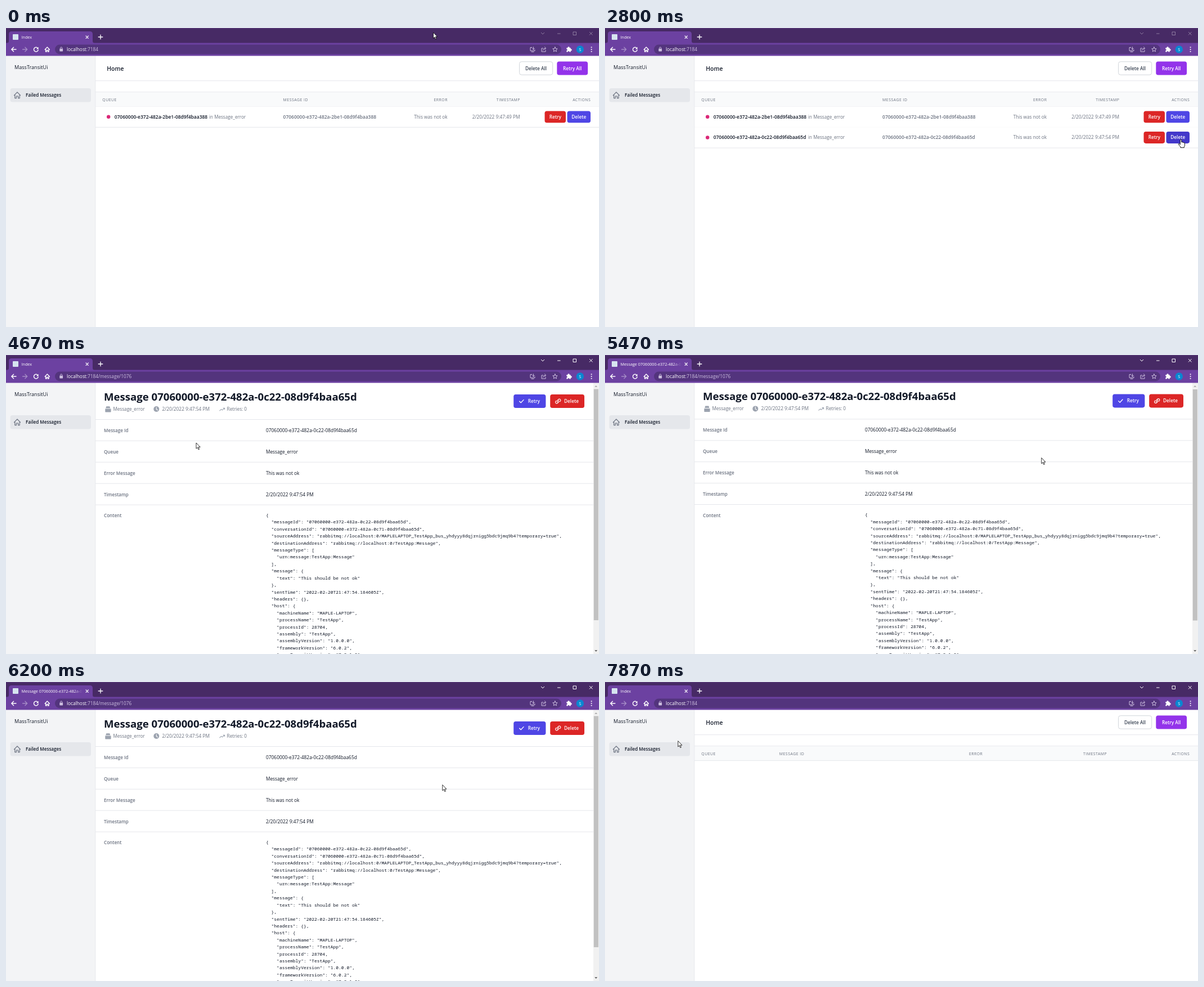
Recreate the animation shown at these times as an HTML page. Size 1054 by 531 pixels, loop 8 s.

```html
<!DOCTYPE html>
<html lang="en">
<head>
<meta charset="utf-8">
<title>Failed messages</title>
<style>
html, body { margin: 0; width: 100%; height: 100%; overflow: hidden; background: #fff; }
svg { display: block; width: 1054px; height: 531px; }
text { font-family: "Open Sans", "Noto Sans", sans-serif; white-space: pre; }
.code text { font-family: "Noto Sans Mono", "DejaVu Sans Mono", monospace; }
.line { fill: none; stroke-linecap: round; stroke-linejoin: round; }
</style>
</head>
<body>
<svg id="stage" viewBox="0 0 1054 531" xmlns="http://www.w3.org/2000/svg"></svg>
<script>
const LOOP = 8000;
const INK = '#111827', GRAY = '#6b7280', RULE = '#e5e7eb', SOFT = '#f3f4f6';
const RED = '#dc2626', INDIGO = '#4f46e5', VIOLET = '#9333ea';
const DARKER = { [RED]: '#b91c1c', [INDIGO]: '#4338ca', [VIOLET]: '#7e22ce' };
const ID1 = '07060000-e372-482a-2be1-08d9f4baa388';
const ID2 = '07060000-e372-482a-0c22-08d9f4baa65d';

const escape = s => s.replace(/&/g, '&amp;').replace(/</g, '&lt;');
const text = (x, y, s, { size = 8.25, weight = 400, fill = GRAY, anchor = 'start', gap = 0 } = {}) =>
  `<text x="${x}" y="${y}" font-size="${size}" font-weight="${weight}" fill="${fill}" text-anchor="${anchor}" letter-spacing="${gap}">${escape(s)}</text>`;
const rect = (x, y, w, h, fill, r = 0, more = '') =>
  `<rect x="${x}" y="${y}" width="${w}" height="${h}" rx="${r}" fill="${fill}" ${more}/>`;
const rule = (y, fill = RULE, more = '') => rect(159, y, 895, 1, fill, 0, more);
const line = (d, color, width = 1.2, more = '') =>
  `<path class="line" d="${d}" stroke="${color}" stroke-width="${width}" ${more}/>`;
const shape = (d, fill, more = '') => `<path d="${d}" fill="${fill}" ${more}/>`;
const group = (id, body, more = '') => `<g id="${id}" ${more}>${body}</g>`;
const ring = (id, x, y, w, h, color) =>
  rect(x - 1.9, y - 1.9, w + 3.8, h + 3.8, 'none', 5, `id="${id}" stroke="${color}" stroke-width="1.3"`);

// Buttons register their box so the pointer can hover them.
const buttons = [];
function button(id, x, y, w, h, fill, label, labelX = x + w / 2) {
  buttons.push({ id, x, y, w, h, fill });
  return rect(x, y, w, h, fill, 3.8, `id="${id}"`) +
    text(labelX, y + h / 2 + 3, label, { weight: 600, fill: '#fff', anchor: 'middle' });
}

function chrome() {
  const white = '#fff', pale = '#cdbfe0';
  return rect(0, 0, 1054, 27, '#472a65') + rect(0, 0, 1054, 1, '#573a78') +
    rect(0, 26.5, 1054, 23, '#6c41a1') +
    shape('M1 27Q5 27 5 23V11Q5 6 10 6H149Q154 6 154 11V23Q154 27 158 27Z', '#6c41a1') +
    rect(12, 11, 10, 10, '#d6e4f0', 1) +
    `<g clip-path="url(#tabClip)" mask="url(#tabFade)">` +
    group('tabHome', text(27.5, 18.8, 'Index', { size: 7.2, fill: white })) +
    group('tabMessage', text(27.5, 18.8, 'Message ' + ID2, { size: 7.2, fill: white })) + '</g>' +
    line('M142 14L146.4 18.4M146.4 14L142 18.4', white, 1.1) +
    line('M164.2 16H171.8M168 12.2V19.8', white, 1.3) +
    group('controls',
      line('M951 8L954 11L957 8M980 10H985.5M1008 7H1013.5V12.5H1008ZM1037 7L1042.5 12.5M1042.5 7L1037 12.5', white, 1, 'style="stroke-linecap:butt"')) +
    line('M18 38H10M13.6 34.2L9.8 38L13.6 41.8', white, 1.4) +
    line('M29.5 38H37.5M33.9 34.2L37.7 38L33.9 41.8', '#a58cc6', 1.3) +
    line('M56.4 35.6A3.9 3.9 0 1 0 57.2 39', white, 1.4) + shape('M57.6 33.8V37.4H54Z', white) +
    line('M69.2 38.2L73.3 34L77.4 38.2M70.5 37.5V42H72.2V39.4H74.4V42H76.1V37.5', white, 1.3) +
    rect(87, 29.5, 900, 17, '#53347d', 8.5) +
    rect(95.3, 36.8, 5.8, 4.6, pale, .7) + line('M96.6 36.6V35.6A1.6 1.6 0 0 1 99.8 35.6V36.6', pale, 1) +
    `<text x="108" y="41" font-size="8.3" fill="${pale}"><tspan fill="${white}">localhost</tspan>:7184<tspan id="urlPath">/message/1076</tspan></text>` +
    line('M935 34.5H932V40.5H940V38.8M934 42.4H938M937.5 33.8V38.2M935.6 36.5L937.5 38.4L939.4 36.5', pale, 1) +
    line('M954.5 36H952V42H959V39.6M954.5 39.3Q955 36 959 36M957.4 33.8L959.7 36L957.4 38.2', pale, 1) +
    line('M975.9 33.8L977.1 36.6L980.1 36.9L977.8 38.9L978.5 41.9L975.9 40.3L973.3 41.9L974 38.9L971.7 36.9L974.7 36.6Z', pale, 1) +
    shape('M996.3 35.3H998.6A1.5 1.5 0 1 1 1001.4 35.3H1003.7V37.4A1.5 1.5 0 1 1 1003.7 40.2V42.5H1001.5A1.5 1.5 0 0 0 998.5 42.5H996.3V40.2A1.4 1.4 0 0 0 996.3 37.4Z', white) +
    '<circle cx="1020.3" cy="38" r="6.7" fill="#0a86d1"/>' +
    text(1020.3, 40.7, 'S', { size: 7.4, fill: white, anchor: 'middle' }) +
    [34.3, 38, 41.7].map(y => `<circle cx="1040.6" cy="${y}" r="1.05" fill="#fff"/>`).join('');
}

function sidebar() {
  return rect(0, 49.5, 158.5, 482, SOFT) + rect(158.3, 49.5, 1, 482, RULE) +
    text(15, 73.2, 'MassTransitUi', { size: 9.1, fill: INK }) +
    rect(7.5, 107, 143.5, 24.5, RULE, 3.8) +
    line('M14.4 119.6L20 114L25.6 119.6M15.8 118.4V124.6H18.4V121H21.6V124.6H24.2V118.4', GRAY, 1.2) +
    text(35, 122.2, 'Failed Messages', { size: 8.1, weight: 600, fill: INK });
}

function heads(id, messageX, errorX, timeX) {
  const style = { size: 6.9, weight: 500, gap: .5 };
  const end = { ...style, anchor: 'end' };
  return group(id, text(messageX, 129.7, 'MESSAGE ID', style) +
    text(errorX, 129.7, 'ERROR', end) + text(timeX, 129.7, 'TIMESTAMP', end));
}

function row(n, id, time) {
  return group('row' + n,
    rect(159, 139.5, 895, 36.6, '#fff') + rule(175.8, RULE, `id="rowRule${n}"`) +
    '<circle cx="182.2" cy="157.8" r="3.2" fill="#db2777"/>' +
    text(192.7, 160.8, id, { size: 8.47, weight: 600, fill: INK }) +
    text(361, 160.8, 'in Message_error', { size: 8.12 }) +
    group('cells' + n,
      text(492.6, 160.8, id, { size: 8.47, weight: 600 }) +
      text(784.6, 160.8, 'This was not ok', { anchor: 'end', size: 8.27 }) +
      text(913.6, 160.8, time, { anchor: 'end', size: 8.37 })) +
    button('retry' + n, 957.5, 147.4, 37.5, 20.8, RED, 'Retry') +
    button('delete' + n, 997.5, 147.4, 41.5, 20.8, INDIGO, 'Delete') +
    (n === 2 ? ring('rowFocus', 997.5, 147.4, 41.5, 20.8, INDIGO) : ''));
}

function home() {
  return rect(159.3, 49.5, 895, 482, '#fff') +
    text(179.3, 75.8, 'Home', { size: 10.4, weight: 600, fill: INK }) +
    rect(912.5, 59.8, 59.2, 23.4, '#fff', 3.8, 'stroke="#d1d5db" stroke-width="1"') +
    text(942, 74.5, 'Delete All', { weight: 600, fill: '#374151', anchor: 'middle' }) +
    button('retryAll', 979.3, 59.5, 54.8, 24, VIOLET, 'Retry All') +
    rule(93.2) + rule(113.2) + rect(159.3, 114.2, 895, 25, '#f9fafb') + rule(139.1) +
    text(171.3, 129.7, 'QUEUE', { size: 6.9, weight: 500, gap: .5 }) +
    text(1039.3, 129.7, 'ACTIONS', { size: 6.9, weight: 500, gap: .5, anchor: 'end' }) +
    heads('headsFull', 492.6, 785, 914) + heads('headsEmpty', 309.8, 671.4, 892.2) +
    row(1, ID1, '2/20/2022 9:47:49 PM') + row(2, ID2, '2/20/2022 9:47:54 PM');
}

const CONTENT = `{
  "messageId": "${ID2}",
  "conversationId": "07060000-e372-482a-0c71-08d9f4baa65d",
  "sourceAddress": "rabbitmq://localhost:0/MAPLELAPTOP_TestApp_bus_yhdyyy8dqjrnigg5bdc9jmq9b4?temporary=true",
  "destinationAddress": "rabbitmq://localhost:0/TestApp:Message",
  "messageType": [
    "urn:message:TestApp:Message"
  ],
  "message": {
    "text": "This should be not ok"
  },
  "sentTime": "2022-02-20T21:47:54.184605Z",
  "headers": {},
  "host": {
    "machineName": "MAPLE-LAPTOP",
    "processName": "TestApp",
    "processId": 28704,
    "assembly": "TestApp",
    "assemblyVersion": "1.0.0.0",
    "frameworkVersion": "6.0.2",
    "massTransitVersion": "7.3.1.0",
    "operatingSystemVersion": "Microsoft Windows NT 10.0.19043.0"
  }
}`;

function detail() {
  const soft = '#9ca3af';
  const fields = [['Message Id', ID2, 8.39], ['Queue', 'Message_error'], ['Error Message', 'This was not ok'],
    ['Timestamp', '2/20/2022 9:47:54 PM', 8.35], ['Content', '']];
  const page =
    text(174, 80.8, 'Message ' + ID2, { size: 18.62, weight: 700, fill: INK }) +
    shape('M178.3 91.2H184.3L185.4 94.6H177.2ZM176.3 95.6H186.6V100.8Q186.6 101.6 185.8 101.6H177.1Q176.3 101.6 176.3 100.8Z', soft) +
    text(190.4, 99, 'Message_error', { size: 8.17 }) +
    `<circle cx="267.3" cy="96" r="5" fill="${soft}"/>` + line('M267.3 93V96.2L269.5 98', '#fff', 1.1) +
    text(277.4, 99, '2/20/2022 9:47:54 PM', { size: 8.35 }) +
    line('M379.8 98.8L382.6 96.4L384.6 97.8L388.4 94.4M386 94.2H388.6V96.6', soft, 1.1) +
    text(392.6, 99, 'Retries: 0', { size: 8.2 }) +
    button('retryOne', 902.2, 70, 57.2, 24, INDIGO, 'Retry', 938.3) +
    line('M912.6 82.2L915.2 84.8L920 79.6', '#fff', 1.3) +
    button('deleteOne', 967.2, 70, 60.8, 24, RED, 'Delete', 1005) +
    line('M980.4 83.6A2.3 2.3 0 0 1 980.4 80.4L982.2 78.6A2.3 2.3 0 0 1 985.4 81.8L984.5 82.7M982 80.6A2.3 2.3 0 0 1 982 83.8L980.2 85.6A2.3 2.3 0 0 1 977 82.4L977.9 81.5', '#fff', 1.2) +
    ring('deleteFocus', 967.2, 70, 60.8, 24, RED) +
    fields.map(([label, value, size = 8.25], i) => {
      const y = 114 + i * 37.9;
      return rect(159, y, 885, 1, RULE) +
        text(174, y + 22.8, label, { size: 8.1, weight: 600 }) +
        text(462, y + 22.8, value, { size, fill: INK });
    }).join('') +
    group('json', CONTENT.split('\n').map((s, i) =>
      text(462, 287 + i * 12.41, s.replace(/ /g, '\u00a0'), { size: 7.985, weight: 500, fill: INK })).join(''), 'class="code"');
  return rect(159.3, 49.5, 895, 482, '#fff') +
    `<g clip-path="url(#pageClip)">${group('scroller', page)}</g>` +
    rect(1044, 49.5, 10, 482, '#f1f1f1') + rect(1044.7, 60.5, 8.2, 410.5, '#c1c1c1', 0, 'id="thumb"') +
    shape('M1046.2 56.8H1051.2L1048.7 54.2Z', '#505050', 'id="arrowUp"') +
    shape('M1046.2 524.2H1051.2L1048.7 526.8Z', '#505050', 'id="arrowDown"');
}

const pointer = group('cursor',
  group('arrow', shape('M0 0V10.3L2.4 8.1L4 12L5.6 11.3L4 7.5H7.2Z', '#fff', 'stroke="#000" stroke-width=".8"')) +
  group('hand', shape('M-1.2 1.2Q-1.2 0 0 0T1.2 1.2V4.6Q2.6 4 3.3 5.1Q4.7 4.6 5.4 5.8Q7 5.6 7 7.2V10Q7 11.5 5.8 13V14.4H-.6V13L-4 9Q-4.6 7.4 -3.2 7.4L-1.2 9Z',
    '#fff', 'stroke="#000" stroke-width=".9"')) +
  group('busy', '<circle cx="9" cy="0" r="3.7" fill="none" stroke="#3aa0e8" stroke-width="1.8"/>'));

document.getElementById('stage').innerHTML =
  `<defs><clipPath id="tabClip"><rect x="27" y="8" width="109" height="16"/></clipPath>
  <clipPath id="pageClip"><rect x="159" y="49.5" width="885" height="482"/></clipPath>
  <linearGradient id="fade"><stop offset=".86" stop-color="#fff"/><stop offset="1" stop-color="#000"/></linearGradient>
  <mask id="tabFade" maskUnits="userSpaceOnUse" x="27" y="8" width="109" height="16"><rect x="27" y="8" width="109" height="16" fill="url(#fade)"/></mask></defs>` +
  group('home', home()) + group('detail', detail()) + sidebar() + chrome() + pointer;

const $ = id => document.getElementById(id);
const show = (id, on) => { $(id).style.display = on ? '' : 'none'; };
const shift = (id, x, y) => $(id).setAttribute('transform', `translate(${x} ${y})`);

// Pointer moves: first step, last step, step count, end point, optional bend point.
const MOVES = [
  [2330, 2800, 8, 1023.5, 198, 1090, 60],
  [3200, 3330, 3, 1021, 158],
  [3930, 4130, 4, 354, 164],
  [4330, 4330, 1, 347, 162],
  [4400, 4470, 2, 338, 156],
  [4870, 5270, 7, 775.8, 182.6],
  [6330, 6600, 5, 1005, 82],
  [7470, 7870, 7, 129.8, 104.7]
];
// Scroll offset from each time on.
const SCROLL = [[0, 0], [5470, .6], [5530, 22], [5600, 48], [5670, 58], [6070, 40], [6130, 10], [6200, 0]];

function pointerAt(t) {
  let x = 759.5, y = 8;
  for (const [start, end, n, toX, toY, bendX = (x + toX) / 2, bendY = (y + toY) / 2] of MOVES) {
    if (t < start) break;
    const gap = n > 1 ? (end - start) / (n - 1) : 1;
    const k = Math.min(n, Math.floor((t - start) / gap + .05) + 1) / n;
    const p = k * k * (3 - 2 * k), q = 1 - p;
    x = q * q * x + 2 * p * q * bendX + p * p * toX;
    y = q * q * y + 2 * p * q * bendY + p * p * toY;
  }
  return [x, y];
}

function draw(t) {
  const [x, y] = pointerAt(t);
  const scroll = SCROLL.filter(s => s[0] <= t).pop()[1];
  const onDetail = t >= 4600 && t < 7270, empty = t >= 7270;
  const first = t < 3730, second = t >= 1730 && !empty;
  const drop = first ? 36.7 : 0;

  show('home', !onDetail);
  show('detail', onDetail);
  show('urlPath', onDetail);
  const messageTab = t >= 4870 && t < 7470;
  show('tabHome', !messageTab);
  show('tabMessage', messageTab);
  $('controls').setAttribute('opacity', t < 3600 ? .38 : 1);

  show('row1', first);
  show('row2', second);
  shift('row2', 0, drop);
  $('rowRule1').setAttribute('fill', second ? SOFT : RULE);
  show('headsFull', !empty);
  show('headsEmpty', empty);
  const nudge = second ? .5 : 0;
  ['headsFull', 'cells1', 'cells2'].forEach(id => shift(id, nudge, 0));
  show('rowFocus', t >= 3730);

  shift('scroller', 0, -scroll);
  shift('thumb', 0, scroll * .85);
  $('arrowUp').setAttribute('fill', scroll > 0.8 ? '#505050' : '#a3a3a3');
  $('arrowDown').setAttribute('fill', scroll < 58 ? '#505050' : '#a3a3a3');
  show('deleteFocus', t >= 7130);

  const live = { retry1: first, delete1: first, retry2: second, delete2: second, retryAll: true };
  let over = !onDetail && second && !first && x > 192 && x < 359 && y > 151 && y < 161;
  for (const b of buttons) {
    const detailButton = b.id.endsWith('One');
    const top = b.y + (b.id.endsWith('2') ? drop : 0) - (detailButton ? scroll : 0);
    const active = detailButton ? onDetail : !onDetail && live[b.id];
    const hit = active && x >= b.x && x <= b.x + b.w && y >= top && y <= top + b.h;
    $(b.id).setAttribute('fill', hit ? DARKER[b.fill] : b.fill);
    over = over || hit;
  }
  shift('cursor', x, y);
  show('arrow', !over);
  show('hand', over);
  show('busy', t >= 930 && t < 1000);
}

const start = performance.now();
function tick() {
  draw((performance.now() - start) % LOOP);
  requestAnimationFrame(tick);
}
tick();
</script>
</body>
</html>
```
